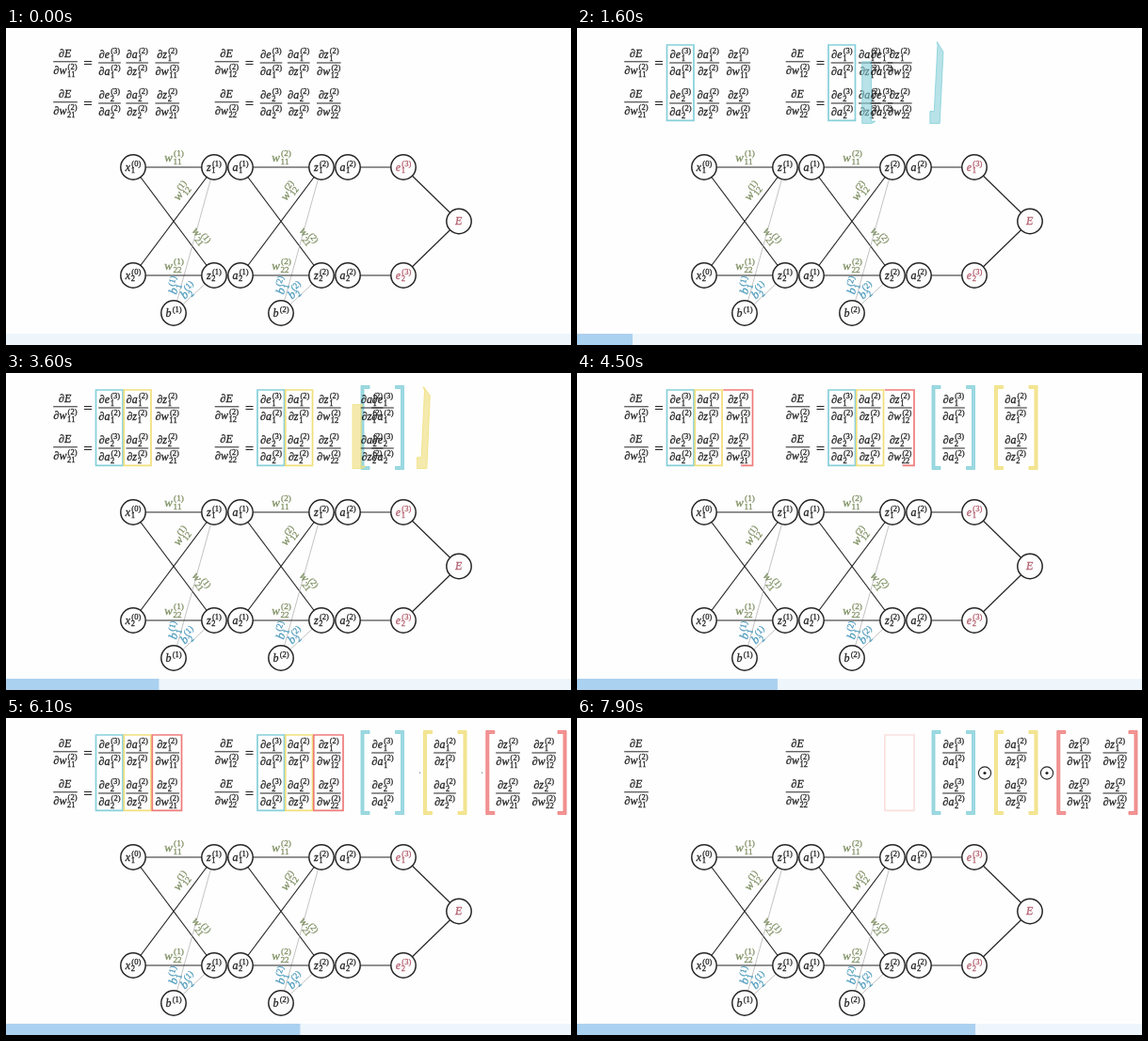
An HTML page with a canvas that plays this animation: 600x337 px, repeating every 8 s.

```html
<!DOCTYPE html>
<html lang="en">
<head>
<meta charset="utf-8">
<title>Backpropagation in matrix form</title>
<style>
  html, body { margin: 0; width: 100%; height: 100%; overflow: hidden; background: #fefefe; }
  canvas { display: block; width: 600px; height: 337px; }
</style>
</head>
<body>
<canvas id="stage"></canvas>
<script>
const canvas = document.getElementById('stage');
const ctx = canvas.getContext('2d');
const dpr = window.devicePixelRatio || 1;
canvas.width = 600 * dpr;
canvas.height = 337 * dpr;

const LOOP = 8000, STEP = 993;
const INK = '#262626', GREEN = '#7f9063', BLUE = '#4f9cbd', ROSE = '#b4606f';
const SERIF = '"Liberation Serif", "Times New Roman", serif';
const RIGHT = 171.5, ROW = 43, BAR_Y = 37;

const clamp = v => Math.min(1, Math.max(0, v));
const lerp = (a, b, k) => a + (b - a) * k;
const sigmoid = v => 1 / (1 + Math.exp(-v));
function smooth(v) {
  const e = sigmoid(-5);
  return clamp((sigmoid(10 * (clamp(v) - 0.5)) - e) / (1 - 2 * e));
}

// Progress of the n-th one-second animation.
const phase = (t, n) => smooth((t - 7 - STEP * n) / 1000);

const barKeys = [[0, 0], [900, 32], [1600, 59], [1800, 67], [2900, 123],
  [4500, 213], [5500, 275], [7300, 387], [7900, 423], [8000, 429]];

// Morph strings pair each bracket corner with one of eight points on the box.
const columns = [
  { color: '#86d0da', num: ['e', 3], den: ['a', 2], x: 110, box: [95.5, 28.5],
    brackets: [377, 422.5], target: [400], morph: ['54456665', '07543310'] },
  { color: '#f1df7b', num: ['a', 2], den: ['z', 2], x: 139.3, box: [125.3, 28.7],
    brackets: [443.5, 489], target: [466], morph: ['54456665', '07543310'] },
  { color: '#ef7b7b', num: ['z', 2], den: ['w', 2], x: 171.3, box: [155.3, 31.2],
    brackets: [509.8, 595], target: [533, 571.3], morph: ['43210065', '16544322'] }
];
const BOX_TOP = 18, BOX_H = 80.3;
const BRACKET = { top: 13.5, bottom: 102.5, w: 9, d: 3 };
const GLYPHS = 170;

// ---- maths text ----
function layout(base, sup = '', sub = '', size = 12) {
  const glyphs = [];
  const main = `italic ${size}px ${SERIF}`, small = `${size * 0.71}px ${SERIF}`;
  const run = (text, font, x, dy) => {
    ctx.font = font;
    for (const ch of text) {
      glyphs.push({ ch, font, x, dy });
      x += ctx.measureText(ch).width;
    }
    return x;
  };
  const end = run(base, main, 0, 0) + 0.6;
  const supEnd = sup === '' ? end : run(`(${sup})`, small, end + 0.6, -size * 0.4);
  const subEnd = sub === '' ? end : run(String(sub), small, end, size * 0.24);
  return { glyphs, width: Math.max(supEnd, subEnd) };
}

// A hairline stroke gives the text its slightly heavy weight.
function drawText(item, x, y, fade) {
  ctx.strokeStyle = ctx.fillStyle;
  ctx.lineWidth = 0.3;
  for (const g of item.glyphs) {
    const gx = x - item.width / 2 + g.x, gy = y + g.dy;
    ctx.globalAlpha = fade ? fade() : 1;
    ctx.font = g.font;
    ctx.fillText(g.ch, gx, gy);
    ctx.strokeText(g.ch, gx, gy);
  }
  ctx.globalAlpha = 1;
}

function fraction(x, y, num, den, fade) {
  const w = Math.max(num.width, den.width) + 0.6;
  ctx.fillStyle = INK;
  drawText(num, x, y - 5, fade);
  ctx.globalAlpha = fade ? fade() : 1;
  ctx.fillRect(x - w / 2, y - 0.5, w, 1);
  drawText(den, x, y + 13, fade);
}

function columnFraction(col, x, row, side, fade) {
  const r = row + 1, [n, ns] = col.num, [d, ds] = col.den;
  const sub = d === 'w' ? `${r}${side + 1}` : r;
  fraction(x, BAR_Y + row * ROW, layout('∂' + n, ns, r), layout('∂' + d, ds, sub), fade);
}

// ---- network ----
function line(x1, y1, x2, y2, color = INK, width = 1.2) {
  ctx.strokeStyle = color;
  ctx.lineWidth = width;
  ctx.beginPath();
  ctx.moveTo(x1, y1);
  ctx.lineTo(x2, y2);
  ctx.stroke();
}

function node(x, y, base, sup, sub, color = INK) {
  ctx.beginPath();
  ctx.arc(x, y, 13.2, 0, 7);
  ctx.fillStyle = '#fefefe';
  ctx.fill();
  ctx.strokeStyle = INK;
  ctx.lineWidth = 1.5;
  ctx.stroke();
  ctx.fillStyle = color;
  drawText(layout(base, sup, sub, 12), x, y + 3.5);
}

function label(x, y, angle, color, base, sup, sub) {
  ctx.save();
  ctx.translate(x, y);
  ctx.rotate(angle * Math.PI / 180);
  ctx.fillStyle = color;
  drawText(layout(base, sup, sub, 13), 0, 3.5);
  ctx.restore();
}

function network() {
  const top = 148, low = 263;
  for (const layer of [1, 2]) {
    const x = layer === 1 ? 135 : 249, z = x + 86, b = x + 43;
    for (const y of [top, low]) {
      line(x, y, z, y);
      line(x, y, z, top + low - y);
      line(b, 303, z, y, '#a9a9a9', 0.7);
    }
    label(x + 43.5, 138, 0, GREEN, 'w', layer, '11');
    label(x + 43.5, 253, 0, GREEN, 'w', layer, '22');
    label(x + 52, 174, -53, GREEN, 'w', layer, '12');
    label(x + 71, 222, 53, GREEN, 'w', layer, '21');
    label(x + 45, 274, -74, BLUE, 'b', layer, 1);
    label(x + 59, 280, -43, BLUE, 'b', layer, 2);
    node(b, 303, 'b', layer);
  }
  for (const [i, y] of [top, low].entries()) {
    line(363, y, 422, y);
    line(422, y, 481, 205.5);
    node(135, y, 'x', 0, i + 1);
    node(221, y, 'z', 1, i + 1);
    node(249, y, 'a', 1, i + 1);
    node(335, y, 'z', 2, i + 1);
    node(363, y, 'a', 2, i + 1);
    node(422, y, 'e', 3, i + 1, ROSE);
  }
  node(481, 205.5, 'E', '', '', ROSE);
}

// ---- boxes and brackets ----
function drawBox(col, side, part, alpha) {
  if (part <= 0 || alpha <= 0) return;
  const [x, w] = col.box, length = 2 * (w + BOX_H);
  ctx.save();
  ctx.globalAlpha = alpha;
  ctx.strokeStyle = col.color;
  ctx.lineWidth = 1.7;
  if (part < 1) ctx.setLineDash([length * part, length]);
  ctx.beginPath();
  ctx.rect(x + side * RIGHT, BOX_TOP, w, BOX_H);
  ctx.stroke();
  ctx.restore();
}

function drawBracket(col, side, k) {
  const { top, bottom, w, d } = BRACKET;
  const outer = col.brackets[side], s = side ? -1 : 1;
  const tip = outer + s * w, inner = outer + s * d;
  const goal = [[tip, top], [outer, top], [outer, bottom], [tip, bottom],
    [tip, bottom - d], [inner, bottom - d], [inner, top + d], [tip, top + d]];
  const [bx, bw] = col.box, cx = bx + bw / 2 + side * RIGHT, cy = BOX_TOP + BOX_H / 2;
  const ux = [1, 0, -1, -1, -1, 0, 1, 1], uy = [-1, -1, -1, 0, 1, 1, 1, 0];
  ctx.beginPath();
  goal.forEach(([x, y], i) => {
    const p = +col.morph[side][i];
    ctx.lineTo(lerp(cx + ux[p] * bw / 2, x, k), lerp(cy + uy[p] * BOX_H / 2, y, k));
  });
  ctx.closePath();
  ctx.fillStyle = ctx.strokeStyle = col.color;
  ctx.globalAlpha = 0.8 * k;
  ctx.fill();
  ctx.globalAlpha = 0.9;
  ctx.lineWidth = 0.9;
  ctx.stroke();
  ctx.globalAlpha = 1;
}

// ---- scene ----
function equations(t) {
  const gone = phase(t, 7) * (GLYPHS + 3);
  let index = 0;
  const fade = () => 1 - clamp((gone - index++) / 4);
  const cells = [[0, 0], [0, 1], [1, 0], [1, 1]];

  for (const [row, side] of cells) {
    const x = side * RIGHT, y = BAR_Y + row * ROW;
    fraction(63 + x, y - 1.2, layout('∂E'), layout('∂w', 2, `${row + 1}${side + 1}`));
    ctx.globalAlpha = fade();
    ctx.fillRect(83 + x, y - 2, 8, 1);
    ctx.fillRect(83 + x, y + 1, 8, 1);
    ctx.globalAlpha = 1;
  }
  columns.forEach((col, c) => {
    for (const [row, side] of cells) columnFraction(col, col.x + side * RIGHT, row, side, fade);
    for (const side of [0, 1]) drawBox(col, side, phase(t, 2 * c), fade());
  });
}

function matrices(t) {
  columns.forEach((col, c) => {
    const k = phase(t, 2 * c + 1);
    if (k <= 0) return;
    for (const side of [0, 1]) drawBracket(col, side, k);
    col.target.forEach((x, side) => {
      for (const row of [0, 1])
        columnFraction(col, lerp(col.x + side * RIGHT, x, k), row, side);
    });
  });
}

function products(t) {
  const k = phase(t, 6);
  if (k <= 0) return;
  for (const x of [433, 499]) {
    ctx.strokeStyle = ctx.fillStyle = INK;
    ctx.lineWidth = 1.1;
    ctx.beginPath();
    ctx.arc(x, 58.5, 6.6, 0, -2 * Math.PI * k, true);
    ctx.stroke();
    ctx.beginPath();
    ctx.arc(x, 58.5, 1.6 * k, 0, 7);
    ctx.fill();
  }
}

function progressBar(t) {
  const i = barKeys.findIndex(([time]) => time > t);
  const [t0, w0] = barKeys[i - 1], [t1, w1] = barKeys[i];
  ctx.fillStyle = '#eef6fb';
  ctx.fillRect(0, 325, 600, 12);
  ctx.fillStyle = '#abd1f0';
  ctx.fillRect(0, 325, lerp(w0, w1, (t - t0) / (t1 - t0)), 12);
}

function draw(t) {
  ctx.setTransform(dpr, 0, 0, dpr, 0, 0);
  ctx.fillStyle = '#fefefe';
  ctx.fillRect(0, 0, 600, 337);
  network();
  equations(t);
  matrices(t);
  products(t);
  progressBar(t);
}

const start = performance.now();
function tick() {
  draw((performance.now() - start) % LOOP);
  requestAnimationFrame(tick);
}
tick();
</script>
</body>
</html>
```
